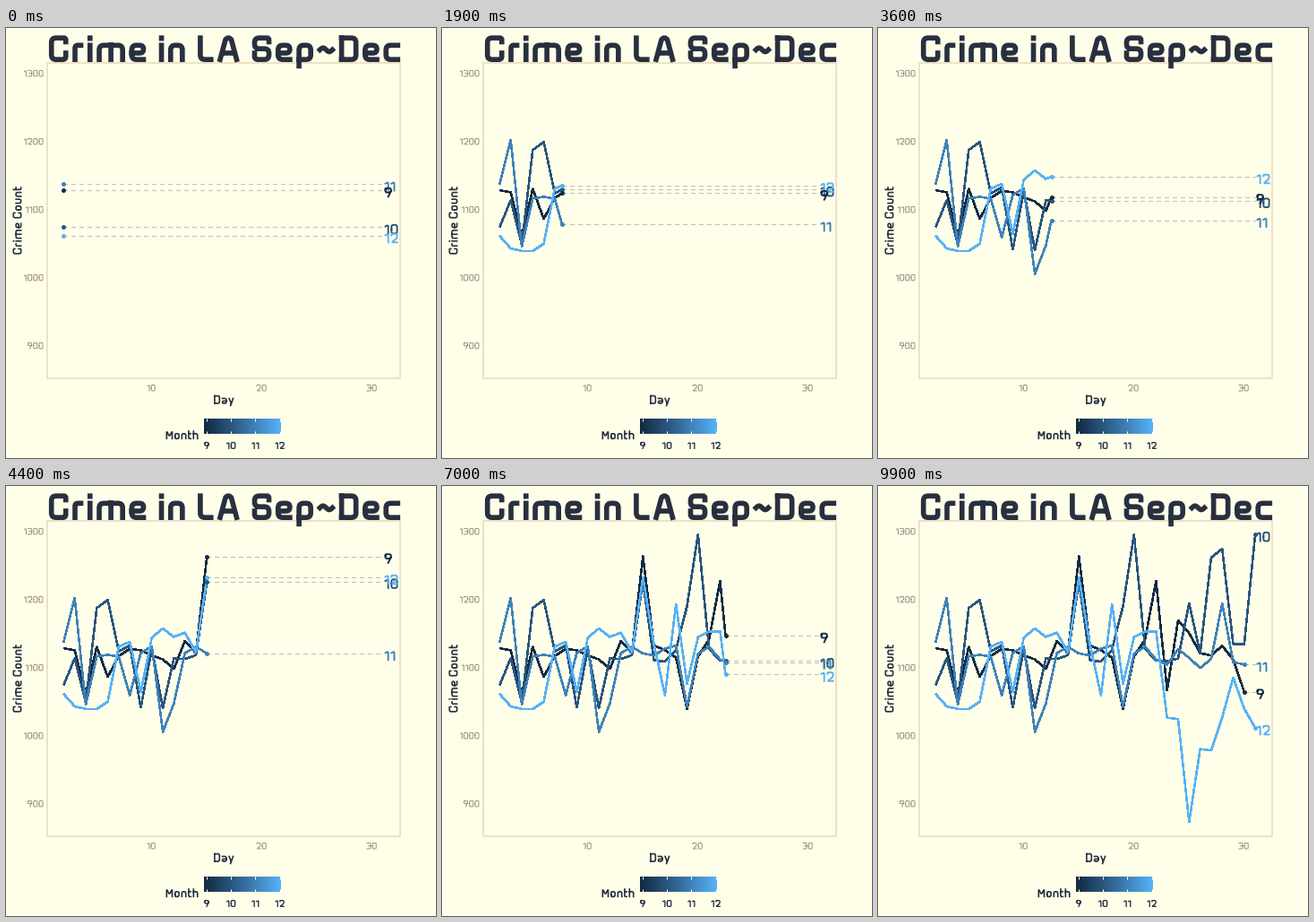
A matplotlib script for the animation above (10000 ms loop, 480x480 px).

```python
import numpy as np
import matplotlib.pyplot as plt
from matplotlib.animation import FuncAnimation
from matplotlib.colors import LinearSegmentedColormap
from matplotlib.patches import PathPatch, Rectangle
from matplotlib.path import Path
from matplotlib.transforms import Affine2D

SIZE, FRAMES, INTERVAL = 480, 100, 100
FIRST_DAY, LAST_DAY = 2, 31
MONTHS = range(9, 13)
PAPER, INK, TAN, BORDER = "#fffee9", "#28303f", "#9c8f7c", "#ebdec3"
BLUES = LinearSegmentedColormap.from_list("blues", ["#132b43", "#336a98", "#56b1f7"])

# Days that stand out from a month's usual level
EVENTS = {
    9: {2: 1128, 4: 1061, 6: 1086, 15: 1263, 19: 1039, 22: 1227, 23: 1066,
        24: 1169, 30: 1064},
    10: {2: 1074, 4: 1048, 5: 1187, 6: 1199, 9: 1041, 11: 1040, 15: 1226,
         19: 1190, 20: 1295, 25: 1194, 27: 1261, 28: 1274, 31: 1295},
    11: {2: 1137, 3: 1202, 4: 1045, 8: 1059, 11: 1005, 12: 1047, 19: 1042, 28: 1194},
    12: {2: 1061, 9: 1064, 15: 1232, 17: 1059, 18: 1193, 19: 1076, 25: 873,
         26: 980, 27: 978, 29: 1085},
}


def daily_counts(month):
    """Usual level with a little seeded scatter, overridden by events."""
    days = np.arange(FIRST_DAY, 31 + (month % 2 == 0))
    level = np.full(len(days), 1122.0)
    if month == 12:
        level = np.where((days > 6) & (days < 23), 1145, 1030)
    counts = level + np.random.default_rng(month).normal(0, 12, len(days))
    for day, count in EVENTS[month].items():
        counts[day - FIRST_DAY] = count
    return days, counts


# Lettering: each stroke is a walk over named columns and rows,
# grouped by the width of a column
COLS = dict(l=0, a=0.7, c=1, b=1.3, r=2, w=4)
ROWS = dict(T=1, S=0.98, H=0.82, X=0.66, M=0.5, L=0.3, B=0, D=-0.3)
WALKS = {
    3.1: {"A": "lB aT bT rB, aL bL", "M": "lB lT cL rT rB"},
    2.7: {
        "C": "rH rT lT lB rB rL",
        "S": "rH rT lT lM rM rB lB lL",
        "D": "lB lT, lT rT rB lB",
        "0": "lM lT rT rB lB lM",
        "1": "lH cT cB",
        "2": "lH lT rT rM lB rB",
        "3": "lT rT rB lB, aM rM",
        "9": "lH lT rT rM lM lH, rX cB",
    },
    2.2: {
        "r": "lB lX cX",
        "i": "lB lX, lT lS",
        "m": "lB lX wX wB, rX rB",
        "n": "lB lX rX rB",
        "h": "lB lT, lX rX rB",
        "u": "lX lB rB rX",
        "o": "lL lX rX rB lB lL",
        "e": "lL rL rX lX lB rB",
        "c": "rX lX lB rB",
        "p": "lD lX rX rB lB",
        "t": "lT lB cB, lX cX",
        "a": "lX rX rB lB lL rL",
        "y": "lX cB, rX aD",
    },
    2.0: {"L": "lT lB rB"},
}
GLYPHS = {
    ch: [[(step * COLS[node[0]], ROWS[node[1]]) for node in walk.split()]
         for walk in walks.split(",")]
    for step, group in WALKS.items() for ch, walks in group.items()
}
GLYPHS["~"] = [[(4.7 * t, 0.45 + 0.09 * np.sin(2 * np.pi * t))
                for t in np.linspace(0, 1, 17)]]
GAP, SPACE = 1.55, 3.3


def rounded(pts, radius):
    """Vertices and codes of a polyline with softened corners."""
    verts, codes = [pts[0]], [Path.MOVETO]
    for a, p, b in zip(pts, pts[1:], pts[2:]):
        da, db = a - p, b - p
        la, lb = np.hypot(*da), np.hypot(*db)
        r = min(radius, la / 2, lb / 2)
        verts += [p + da * r / la, p, p + db * r / lb]
        codes += [Path.LINETO, Path.CURVE3, Path.CURVE3]
    return verts + [pts[-1]], codes + [Path.LINETO]


def lettering(x, y, string, cap, color, weight, align=0.5, angle=0, z=5):
    """Draw a string with its baseline at y; align 0, 0.5 or 1."""
    unit = cap / 10
    verts, codes, pen = [], [], 0
    for ch in string:
        if ch == " ":
            pen += SPACE
            continue
        for stroke in GLYPHS[ch]:
            pts = [np.array([pen + weight / 2 + px,
                             -weight / 2 - py * (10 - weight)]) * unit
                   for px, py in stroke]
            v, c = rounded(pts, 1.7 * unit)
            verts += v
            codes += c
        pen += max(px for stroke in GLYPHS[ch] for px, _ in stroke) + weight + GAP
    width = (pen - GAP) * unit
    shape = Path(np.array(verts) - [width * align, 0], codes)
    place = Affine2D().rotate_deg(angle).translate(x, y)
    patch = PathPatch(shape, fill=False, ec=color, lw=weight * unit,
                      capstyle="projecting", joinstyle="miter",
                      transform=place + ax.transData, zorder=z)
    return ax.add_artist(patch)


def day_x(day):
    return 39.3 + 12.3 * np.asarray(day)


def count_y(count):
    return 49.9 + 0.76 * (1300 - np.asarray(count))


fig = plt.figure(figsize=(SIZE / 72, SIZE / 72), dpi=72, facecolor=PAPER)
ax = fig.add_axes([0, 0, 1, 1])
ax.axis("off")

# Panel, titles and ticks
ax.add_artist(Rectangle((45.5, 38), 394, 352.5, fill=False, ec=BORDER, lw=1.8))
lettering(243.5, 37.5, "Crime in LA Sep~Dec", 29.7, INK, 1.9)
lettering(242.7, 419.3, "Day", 10, INK, 1.65)
lettering(17, 214.5, "Crime Count", 10, INK, 1.65, angle=-90)
for count in range(900, 1301, 100):
    lettering(41, count_y(count) + 4, str(count), 7.5, TAN, 1.3, align=1)
for day in (10, 20, 30):
    lettering(day_x(day) - 0.7, 405, str(day), 7.5, TAN, 1.3)

# Colour bar
lettering(178, 458.7, "Month", 10, INK, 1.65, align=0)
ax.imshow(np.linspace(0, 1, 30)[None], cmap=BLUES, aspect="auto",
          interpolation="bilinear", extent=(220.5, 306.5, 452.5, 435.5))
for month in MONTHS:
    x = 223.5 + 27.2 * (month - 9)
    for top in (435.5, 449.1):
        ax.plot([x, x], [top, top + 3.4], color="white", lw=1, solid_capstyle="butt")
    lettering(x, 469.5, str(month), 8, INK, 1.65)
ax.set(xlim=(-0.5, SIZE - 0.5), ylim=(SIZE - 0.5, -0.5))


class Series:
    def __init__(self, month):
        color = BLUES((month - 9) / 3)
        order = (month - 10) % 4 / 10
        self.days, self.counts = daily_counts(month)
        # Each day is reached on a whole step
        span = LAST_DAY - FIRST_DAY
        self.keys = np.round((self.days - FIRST_DAY) * (FRAMES - 1) / span)
        self.line, = ax.plot([], [], color=color, lw=1.5, antialiased=False,
                             solid_joinstyle="round", solid_capstyle="butt",
                             zorder=2 + month / 100)
        self.guide, = ax.plot([], [], color="#bebebe", lw=1, antialiased=False,
                              dashes=(4, 4), dash_capstyle="butt", zorder=3)
        self.dot, = ax.plot([], [], "o", color=color, ms=5, mew=0, zorder=4 + order)
        self.label = lettering(0, 0, str(month), 11.5, color, 1.65, align=0, z=6 + order)

    def show(self, step):
        day = np.interp(step, self.keys, self.days)
        x, y = day_x(day), count_y(np.interp(day, self.days, self.counts))
        past = self.days < day
        self.line.set_data(np.append(day_x(self.days[past]), x),
                           np.append(count_y(self.counts[past]), y))
        self.guide.set_data([x, day_x(LAST_DAY)], [y, y])
        self.dot.set_data([x], [y])
        self.label.set_transform(
            Affine2D().translate(day_x(LAST_DAY) + 1.5, y + 8.2) + ax.transData)


series = [Series(month) for month in MONTHS]


def draw(step):
    for s in series:
        s.show(step)
    return []


anim = FuncAnimation(fig, draw, frames=FRAMES, interval=INTERVAL,
                     init_func=lambda: draw(0), repeat=True, repeat_delay=0)
plt.show()
```
